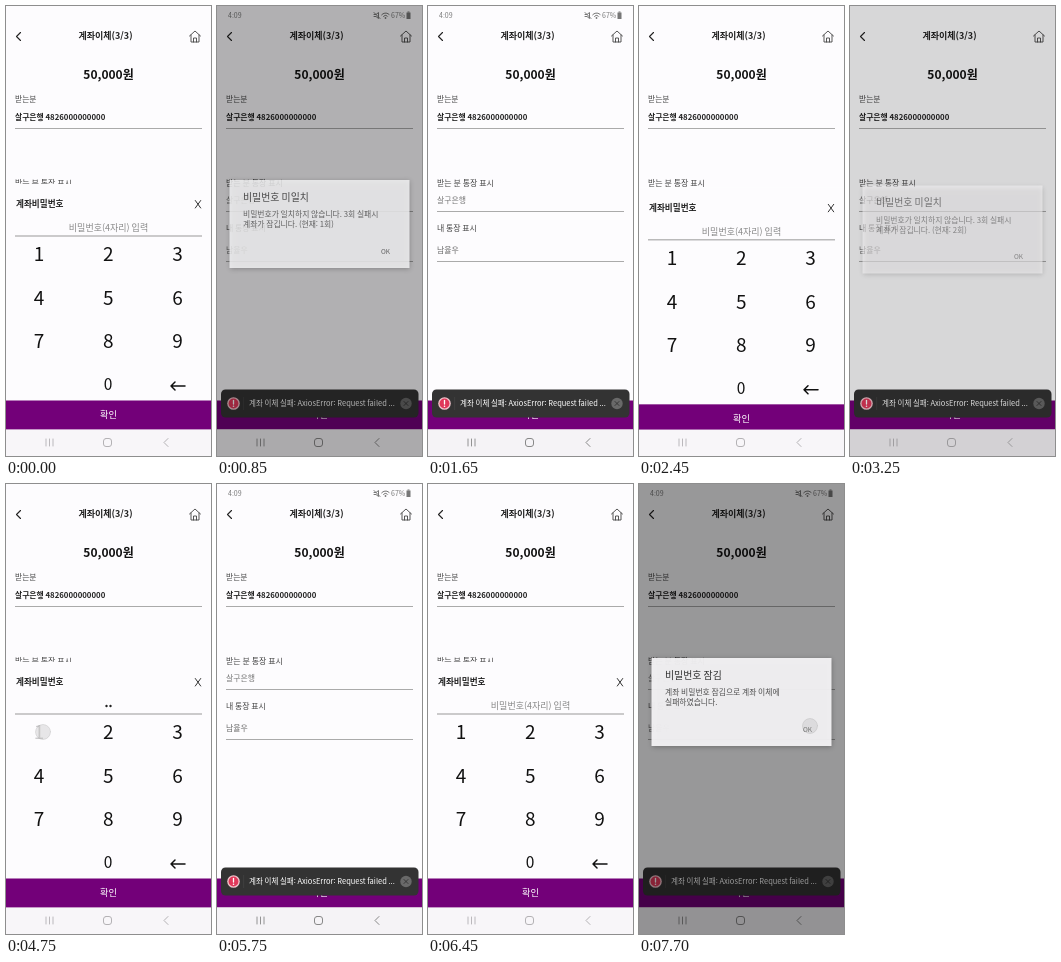
Animation, 205 px wide and 450 px high, one loop 7750 ms. Source, as an HTML page with a canvas:

```html
<!DOCTYPE html>
<html lang="ko">
<head>
<meta charset="utf-8">
<title>계좌이체</title>
<style>
html, body { margin: 0; width: 100%; height: 100%; overflow: hidden; background: #fdfcfe; }
canvas { display: block; width: 205px; height: 450px; }
</style>
</head>
<body>
<canvas id="stage"></canvas>
<script>
const W = 205, H = 450, LOOP = 7750, STEP = 50;
const FONT = '"Noto Sans CJK KR", "Noto Sans CJK", "Noto Sans", sans-serif';
const PURPLE = '#730079', INK = '#222', PAPER = '#fdfcfe';
const SHEET_TOP = 178, SHEET_END = 423.5;
const BANK = '살구은행', ACCOUNT = '4826000000000', OWNER = '남율우';

// Each try: sheet opens, typing starts, sheet closes, dialog is dismissed.
const TRIES = [
  { open: -400, type: 150, close: 700, out: 1560 },
  { open: 2300, type: 2650, close: 3150, out: 3860 },
  { open: 4250, type: 4650, close: 5100, out: 5660 },
  { open: 6250, type: 6550, close: 7050, out: 7690, locked: true }
];

const canvas = document.getElementById('stage');
const g = canvas.getContext('2d');
const dpr = Math.max(1, window.devicePixelRatio || 1);
canvas.width = W * dpr;
canvas.height = H * dpr;

const clamp = v => Math.min(1, Math.max(0, v));
const easeOut = v => 1 - Math.pow(1 - clamp(v), 3);
const within = (t, a, b) => t >= a && t < b;

function text(s, x, y, size, color = INK, weight = 400, align = 'left') {
  g.font = `${weight} ${size}px ${FONT}`;
  g.fillStyle = color;
  g.textAlign = align;
  g.textBaseline = 'alphabetic';
  g.fillText(s, x, y + size * 0.36);
}

function rect(x, y, w, h, color) {
  g.fillStyle = color;
  g.fillRect(x, y, w, h);
}

function disc(x, y, r, color) {
  g.fillStyle = color;
  g.beginPath();
  g.arc(x, y, r, 0, Math.PI * 2);
  g.fill();
}

function lines(color, width, ...paths) {
  g.strokeStyle = color;
  g.lineWidth = width;
  g.lineCap = g.lineJoin = 'round';
  g.beginPath();
  for (const p of paths) {
    g.moveTo(p[0], p[1]);
    for (let i = 2; i < p.length; i += 2) g.lineTo(p[i], p[i + 1]);
  }
  g.stroke();
}

function box(x, y, w, h, r) {
  g.beginPath();
  g.roundRect(x, y, w, h, r);
}

function touch(x, y) {
  disc(x, y, 7.5, 'rgba(190,190,190,0.35)');
  g.strokeStyle = 'rgba(150,150,150,0.3)';
  g.lineWidth = 0.8;
  g.stroke();
}

function statusBar() {
  const c = '#777';
  text('4:09', 11, 9.5, 7, c);
  lines(c, 1, [157, 8.5, 159, 8.5, 161.5, 6.5, 161.5, 12.5, 159, 10.5, 157, 10.5], [157, 6.5, 163, 12.5]);
  g.strokeStyle = c;
  g.lineWidth = 1;
  for (const r of [2.6, 5]) {
    g.beginPath();
    g.arc(168.5, 12, r, -Math.PI * 0.78, -Math.PI * 0.22);
    g.stroke();
  }
  disc(168.5, 12, 0.9, c);
  text('67%', 174, 9.5, 7, c);
  rect(189.5, 6.5, 4, 6.5, c);
  rect(190.5, 5.5, 2, 1, c);
}

function navBar(covered) {
  const c = covered ? '#b4b2b5' : '#888';
  rect(0, SHEET_END, W, H - SHEET_END, covered ? '#f8f6f9' : '#f5f3f6');
  lines(c, 0.9, [40, 433, 40, 440], [43.5, 433, 43.5, 440], [47, 433, 47, 440]);
  g.lineWidth = 1;
  box(97.5, 432.5, 8, 8, 2.5);
  g.stroke();
  lines(c, 1, [162, 432.5, 158, 436.5, 162, 440.5]);
}

function confirmButton() {
  rect(0, 394.5, W, 29, PURPLE);
  text('확인', 102.5, 408.5, 9.2, '#fff', 400, 'center');
}

function page(covered) {
  rect(0, 0, W, H, PAPER);
  if (!covered) statusBar();
  lines(INK, 1.1, [14.5, 26.5, 10.5, 30.5, 14.5, 34.5]);
  text('계좌이체(3/3)', 99.5, 30, 9, INK, 700, 'center');
  lines('#444', 0.9, [183.5, 30, 189, 25, 194.5, 30], [185, 29, 185, 36, 193, 36, 193, 29],
    [187.5, 36, 187.5, 32, 190.5, 32, 190.5, 36]);
  text('50,000원', 102.5, 69, 12, '#111', 700, 'center');
  text('받는분', 9, 93.5, 7.8, '#444');
  text(`${BANK} ${ACCOUNT}`, 9, 111, 7.8, INK, 700);
  text('받는 분 통장 표시', 9, 177, 8, '#444');
  text(BANK, 9, 194, 7.9, '#777');
  text('내 통장 표시', 9, 222, 7.9, '#444');
  text(OWNER, 9, 244, 7.9, '#666');
  for (const y of [122, 205, 255]) rect(9, y, 187, 1, '#aaa');
  confirmButton();
  navBar(covered);
}

function toast() {
  g.fillStyle = '#333';
  box(4, 383.5, 197.5, 28, 4.5);
  g.fill();
  disc(16.5, 397.5, 6.3, '#f0c3cb');
  disc(16.5, 397.5, 4.9, '#e0385a');
  lines('#fff', 1.3, [16.5, 394.5, 16.5, 398]);
  disc(16.5, 400.3, 0.8, '#fff');
  rect(26.5, 391, 0.6, 13, '#484848');
  text('계좌 이체 실패: AxiosError: Request failed ...', 32, 397.5, 7.5, '#fff');
  disc(189, 397.5, 5.7, '#696969');
  lines('#333', 0.9, [187, 395.5, 191, 399.5], [191, 395.5, 187, 399.5]);
}

function keypad(pressed) {
  for (let i = 0; i < 9; i++) {
    g.globalAlpha = pressed && i === 0 ? 0.2 : 1;
    text(String(i + 1), 33 + (i % 3) * 69.3, 248.5 + Math.floor(i / 3) * 43.5, 19, '#111', 500, 'center');
  }
  g.globalAlpha = 1;
  text('0', 102, 378.5, 15.5, '#111', 500, 'center');
  lines('#111', 1.5, [179, 380, 165, 380], [169, 376, 165, 380, 169, 384]);
}

function sheet(shown, t, start) {
  const tap = Math.floor((t - start) / STEP);
  const pressed = tap >= 0 && tap < 4;
  const dots = Math.min(4, Math.max(0, tap));
  g.save();
  g.beginPath();
  g.rect(0, SHEET_TOP, W, SHEET_END - SHEET_TOP);
  g.clip();
  g.translate(0, (1 - shown) * (SHEET_END - SHEET_TOP));
  rect(0, SHEET_TOP, W, SHEET_END - SHEET_TOP, PAPER);
  text('계좌비밀번호', 10, 198, 8.6, INK, 700);
  lines('#333', 1, [189.3, 194.5, 194.7, 202], [194.7, 194.5, 189.3, 202]);
  if (dots) {
    for (let i = 0; i < dots; i++) disc(102.5 + (i - (dots - 1) / 2) * 4, 222, 1.2, INK);
  } else {
    text('비밀번호(4자리) 입력', 102.5, 222, 9, '#888', 400, 'center');
  }
  rect(9, 229.5, 187, 1, '#999');
  keypad(pressed);
  confirmButton();
  if (pressed) touch(37, 248);
  if (tap === 5) touch(101, 407);
  g.restore();
}

function dialog(p, shift, n, locked) {
  rect(0, 0, W, H, `rgba(0,0,0,${0.45 * p})`);
  g.save();
  g.globalAlpha = Math.sqrt(p);
  g.translate(0, shift);
  g.shadowColor = 'rgba(0,0,0,0.3)';
  g.shadowBlur = 5 * dpr;
  g.shadowOffsetY = dpr;
  rect(12.5, 174, 180, 88, '#f6f5f7');
  g.shadowColor = 'transparent';
  text(locked ? '비밀번호 잠김' : '비밀번호 미일치', 26, 191, 9.9, INK);
  const body = locked
    ? ['계좌 비밀번호 잠김으로 계좌 이체에', '실패하였습니다.']
    : ['비밀번호가 일치하지 않습니다. 3회 실패시', `계좌가 잠깁니다. (현재: ${n}회)`];
  body.forEach((s, i) => text(s, 26, 208.5 + i * 10, 7.8, '#444'));
  text('OK', 168.5, 245.5, 6.5, '#444', 400, 'center');
  g.restore();
}

function draw(t) {
  let n = TRIES.length - 1;
  while (n > 0 && t < TRIES[n].open - 150) n--;
  const a = TRIES[n];
  const covered = within(t, a.open, a.close + 150);
  const shown = t < a.close ? easeOut((t - a.open) / 200) : 1 - clamp((t - a.close + 20) / 120);
  const fade = clamp((t - a.close - 50) / 150) * (1 - clamp((t - a.out) / 90));

  g.setTransform(dpr, 0, 0, dpr, 0, 0);
  page(covered);
  toast();
  if (within(t, a.open - 100, a.open)) touch(102, 417);
  if (shown > 0) sheet(shown, t, a.type);
  if (fade > 0) dialog(fade, covered ? 5.5 : 0, n + 1, a.locked);
  if (within(t, a.out - 50, a.out + 50)) touch(171, 242);
}

const begin = performance.now();
function tick() {
  const t = (performance.now() - begin) % LOOP;
  draw(Math.floor(t / STEP) * STEP);
  requestAnimationFrame(tick);
}
tick();
</script>
</body>
</html>
```
